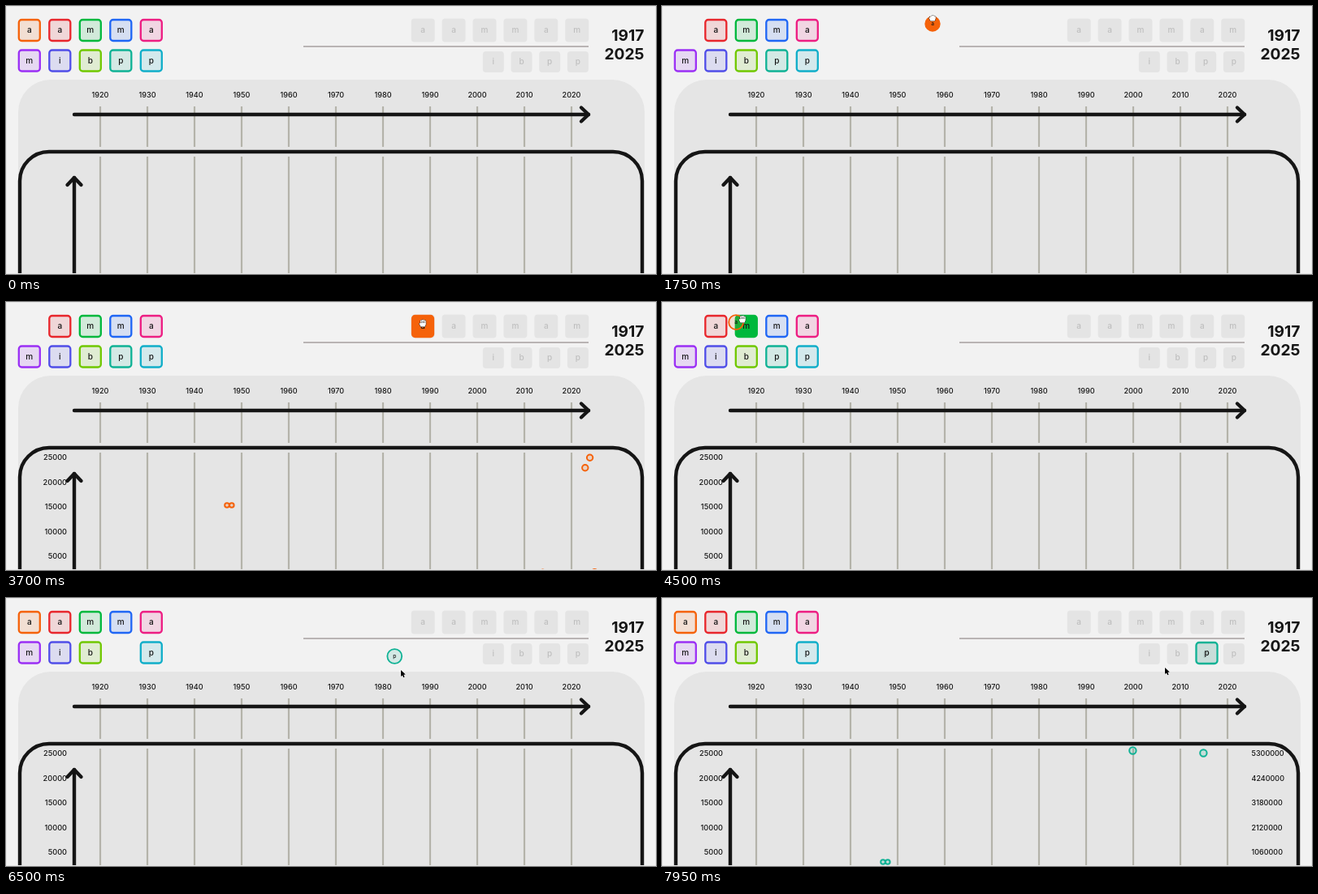
Write an HTML page with a canvas that moves like this. It is 800x331 px and loops after 8000 ms.

```html
<!DOCTYPE html>
<html lang="en">
<head>
<meta charset="utf-8">
<title>Timeline with draggable tiles</title>
<style>
html, body { margin: 0; width: 100%; height: 100%; overflow: hidden; background: #f2f2f2; }
canvas { display: block; }
</style>
</head>
<body>
<canvas id="stage" width="800" height="331"></canvas>
<script>
const ctx = document.getElementById('stage').getContext('2d');
const LOOP = 8000, INK = '#151515', PANEL = '#e5e5e5';
const COLORS = ['#f5620a', '#e8262c', '#00b83c', '#1f66f5', '#ed1d82',
                '#9b2ff5', '#504ee8', '#70c800', '#0fb295', '#10aec9'];
const tiles = [...'aammamibpp'].map((letter, i) => ({
  letter, color: COLORS[i], x: 28.8 + (i % 5) * 37.5, y: i < 5 ? 30 : 67.5
}));

// time, x, y of the pointer
const PATH = [
  [1100, 20, 345], [1400, 31, 30], [1450, 31, 30], [1750, 333, 14],
  [1900, 342, 18], [2050, 342, 18], [2300, 370, 20], [3350, 370, 20],
  [3700, 513, 26], [3780, 513, 26], [4430, 92, 17], [4500, 99, 21],
  [5050, 99, 21], [5400, 93, 37], [5700, 141, 64], [5850, 141, 62],
  [6430, 476, 64], [6500, 487, 89], [6750, 472, 97], [7600, 472, 97],
  [7950, 620, 86]
];
const MOVES = [
  { tile: 0, grab: 1450, drop: 2500, land: 3200, from: tiles[0], to: { x: 513, y: 30 } },
  { tile: 0, grab: 3780, drop: 4440, land: 5190, from: { x: 513, y: 30 }, to: tiles[0] },
  { tile: 8, grab: 5850, drop: 6440, land: 7240, from: tiles[8], to: { x: 670.5, y: 68 } }
];
const HOVERS = [[1360, 1450], [3680, 3780], [4440, 5850]];
// year, y, radius, delay
const SERIES = [
  { color: COLORS[0], start: 2760, end: 4440, dots: [
    [1947, 251, 2.8, 0], [1948, 251, 2.8, 20], [2014, 333.5, 3, 40],
    [2025, 333, 3, 40], [2023, 204.7, 3.7, 90], [2024, 192.3, 3.7, 90]] },
  { color: COLORS[8], start: 6850, end: LOOP, dots: [
    [1947, 326, 2.8, 0], [1948, 326, 2.8, 20], [2000, 188.5, 4.2, 70], [2015, 191.5, 4.2, 90]] }
];

const clamp = v => Math.max(0, Math.min(1, v));
const mix = (a, b, u) => a + (b - a) * u;
const ease = u => u < 0.5 ? 2 * u * u : 1 - 2 * (1 - u) * (1 - u);
const yearX = year => 116 + (year - 1920) * 5.8;

function pointerAt(t) {
  const next = PATH.findIndex(k => k[0] > t);
  if (next === 0) return { x: -50, y: -50 };
  if (next < 0) return { x: PATH.at(-1)[1], y: PATH.at(-1)[2] };
  const [t0, x0, y0] = PATH[next - 1], [t1, x1, y1] = PATH[next];
  const u = ease((t - t0) / (t1 - t0));
  return { x: mix(x0, x1, u), y: mix(y0, y1, u) };
}

function text(str, x, y, size, { weight = 500, color = INK, align = 'center' } = {}) {
  ctx.font = `${weight} ${size}px Inter, sans-serif`;
  ctx.textAlign = align;
  ctx.textBaseline = 'alphabetic';
  ctx.fillStyle = color;
  ctx.fillText(str, x, y);
}

function line(points, color, width) {
  ctx.beginPath();
  points.forEach(([x, y]) => ctx.lineTo(x, y));
  ctx.strokeStyle = color;
  ctx.lineWidth = width;
  ctx.stroke();
}

function box(x, y, size, radius) {
  ctx.beginPath();
  ctx.roundRect(x - size / 2, y - size / 2, size, size, radius);
}

function drawSlots() {
  const slot = (letter, x, y, size) => {
    box(x, y, size, 4);
    ctx.fillStyle = '#e4e4e4';
    ctx.fill();
    text(letter, x, y + 3, 10, { color: '#bfbfbf' });
  };
  [...'aammam'].forEach((c, i) => slot(c, 513.2 + i * 37.9, 30, 29));
  [...'ibpp'].forEach((c, i) => slot(c, 599.8 + i * 34.7, 69, 26));
  line([[366, 50], [717, 50]], '#b9b4b4', 2);
}

function drawChart(t) {
  ctx.beginPath();
  ctx.roundRect(15, 91, 771, 300, 40);
  ctx.fillStyle = PANEL;
  ctx.fill();
  for (let year = 1920; year <= 2020; year += 10) {
    const x = yearX(year);
    text(year, x, 112.6, 9.1);
    line([[x, 124], [x, 174]], '#b4b3aa', 2.2);
    line([[x, 186], [x, 331]], '#b4b3aa', 2.2);
  }
  ctx.beginPath();
  ctx.roundRect(17, 180, 766, 300, 36);
  ctx.strokeStyle = INK;
  ctx.lineWidth = 4.4;
  ctx.stroke();

  for (let i = 0; i < 5; i++) {
    const y = 195.2 + i * 30.5;
    if (t >= 2650) text(25000 - i * 5000, 75, y, 9.2, { align: 'right' });
    if (t >= 6600) text(5300000 - i * 1060000, 725.5, y, 9, { align: 'left' });
  }
  ctx.lineCap = ctx.lineJoin = 'round';
  line([[84, 134], [717, 134]], INK, 4.4);
  line([[708, 125.5], [717, 134], [708, 142.5]], INK, 4.4);
  line([[84, 340], [84, 212]], INK, 4.4);
  line([[75.5, 221], [84, 212], [92.5, 221]], INK, 4.4);
  ctx.lineCap = ctx.lineJoin = 'miter' && 'butt';
  ctx.lineJoin = 'miter';

  for (const { color, start, end, dots } of SERIES) {
    if (t < start || t >= end) continue;
    for (const [year, y, r, delay] of dots) {
      const alpha = clamp((t - start - delay) / 100);
      ctx.beginPath();
      ctx.arc(yearX(year) - 0.6, y, r, 0, 7);
      ctx.globalAlpha = alpha * 0.15;
      ctx.fillStyle = color;
      ctx.fill();
      ctx.globalAlpha = alpha;
      ctx.strokeStyle = color;
      ctx.lineWidth = 2;
      ctx.stroke();
    }
    ctx.globalAlpha = 1;
  }
}

function tileState(tile, i, t) {
  const move = MOVES.filter(m => m.tile === i && m.grab <= t).pop();
  if (!move) return { x: tile.x, y: tile.y, grown: 1, home: true };
  if (t < move.drop) {
    const p = pointerAt(t), u = clamp((t - move.grab) / 120);
    return { x: mix(move.from.x, p.x, u), y: mix(move.from.y, p.y + 8, u), grown: 1 - u, held: true };
  }
  const p = pointerAt(Math.min(move.drop, move.drop - 10));
  const u = ease(clamp((t - move.drop) / (move.land - move.drop)));
  return {
    x: mix(p.x, move.to.x, u), y: mix(p.y + 8, move.to.y, u),
    grown: clamp(u / 0.5), home: u === 1
  };
}

function drawTile(tile, { x, y, grown, held, home }, pointer, hovering) {
  const size = mix(17.6, 26, grown);
  const hit = home && hovering &&
    Math.abs(pointer.x - 4 - x) < 14 && Math.abs(pointer.y - y) < 14;
  box(x, y, size, mix(size / 2, 3.5, grown));
  ctx.fillStyle = tile.color;
  ctx.globalAlpha = held || hit ? 1 : 0.13;
  ctx.fill();
  ctx.globalAlpha = 1;
  ctx.strokeStyle = tile.color;
  ctx.lineWidth = mix(1.8, 2.3, grown);
  ctx.stroke();
  text(tile.letter, x, y + mix(2, 3, grown), mix(6.5, 10, grown));
}

function drawPointer({ x, y }, kind) {
  ctx.save();
  ctx.translate(x, y);
  ctx.lineJoin = 'round';
  ctx.lineWidth = 0.9;
  ctx.beginPath();
  if (kind === 'arrow') {
    [[-1, 0], [-1, 8], [0.9, 6.4], [2.2, 9.2], [3.6, 8.5], [2.4, 5.8], [4.8, 5.6]]
      .forEach(([px, py]) => ctx.lineTo(px, py));
    ctx.fillStyle = '#000';
    ctx.strokeStyle = '#fff';
  } else {
    const top = kind === 'fist' ? -2.8 : -4.6;
    ctx.moveTo(-2.5, 4.5);
    ctx.lineTo(-4.4, 0.8);
    ctx.quadraticCurveTo(-4, -0.8, -2.6, 0.6);
    for (let i = 0; i < 4; i++) {
      const fx = -3 + i * 1.7, fy = top + Math.abs(i - 1.3) * 0.6;
      ctx.lineTo(fx, fy + 0.9);
      ctx.quadraticCurveTo(fx + 0.8, fy - 0.8, fx + 1.6, fy + 0.9);
    }
    ctx.lineTo(3.8, 1.5);
    ctx.lineTo(2.6, 4.5);
    ctx.closePath();
    ctx.fillStyle = '#fff';
    ctx.strokeStyle = '#111';
  }
  ctx.closePath();
  ctx.stroke();
  ctx.fill();
  if (kind === 'hand') {
    for (const fx of [-1.3, 0.4, 2.1]) line([[fx, -2.6], [fx, 0]], '#111', 0.6);
  }
  ctx.restore();
}

function draw(t) {
  ctx.fillStyle = '#f2f2f2';
  ctx.fillRect(0, 0, 800, 331);
  drawSlots();
  text('1917', 785.5, 42.6, 19.2, { weight: 700, align: 'right' });
  text('2025', 785.5, 66.2, 19.2, { weight: 700, align: 'right' });
  drawChart(t);

  const pointer = pointerAt(t);
  const hovering = HOVERS.some(([a, b]) => t >= a && t < b);
  const dragging = MOVES.some(m => t >= m.grab && t < m.drop);
  const placed = tiles.map((tile, i) => [tile, tileState(tile, i, t)]);
  placed.sort((a, b) => !a[1].home - !b[1].home);
  placed.forEach(([tile, state]) => drawTile(tile, state, pointer, hovering));
  drawPointer(pointer, dragging ? 'fist' : hovering ? 'hand' : 'arrow');

  ctx.strokeStyle = '#e8e8e8';
  ctx.lineWidth = 1;
  ctx.strokeRect(0.5, 0.5, 799, 330);
}

const began = performance.now();
function frame() {
  draw((performance.now() - began) % LOOP);
  requestAnimationFrame(frame);
}
frame();
</script>
</body>
</html>
```
